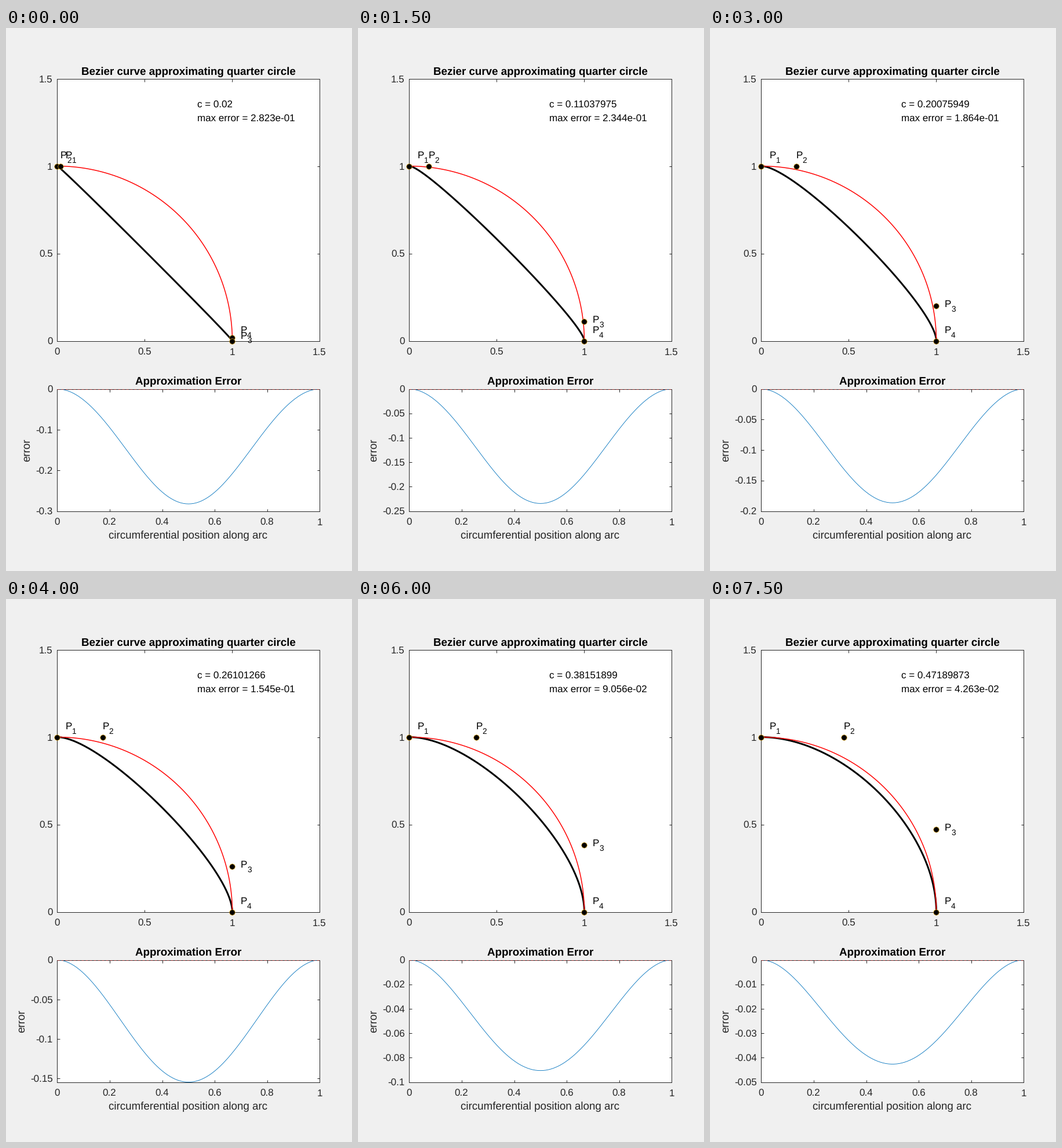
A matplotlib script for the animation above (8 s loop, 597 by 938 pixels).

```python
import math
import numpy as np
import matplotlib.pyplot as plt
from matplotlib.animation import FuncAnimation

W, H, DPI = 597, 938, 72          # at 72 dpi one point is one pixel
FRAMES, INTERVAL = 16, 500
C0, C_STEP = 0.02, 2.38 / 79
BASE, BIG = 17, 18.7
GRAY = "#262626"
BLUE, ORANGE = "#0072BD", "#EDB120"

# Panel edges in pixels from the top left, just inside the pixel centres
LEFT, RIGHT = 88.45, 541.45
TOP1, BOT1 = 87.55, 540.55
TOP2, BOT2 = 623.55, 834.55
MID = 314.5

plt.rcParams.update({
    "font.family": "Liberation Sans",
    "text.hinting": "none",
    "axes.edgecolor": GRAY,
    "axes.linewidth": 1,
})

fig = plt.figure(figsize=(W / DPI, H / DPI), dpi=DPI, facecolor="#F0F0F0")


def panel(top, bottom):
    """Axes with a full box and inward ticks."""
    ax = fig.add_axes([LEFT / W, 1 - bottom / H,
                       (RIGHT - LEFT) / W, (bottom - top) / H])
    ax.tick_params(direction="in", length=4.5, width=1, color=GRAY,
                   top=True, right=True, labelbottom=False, labelleft=False)
    return ax


def put(x, y, text="", size=BASE, color="black", ha="left", **kw):
    """Text with its baseline at a pixel position."""
    return fig.text(x / W, 1 - y / H, text, fontsize=size, color=color,
                    ha=ha, va="baseline", **kw)


def move(text, x, y):
    text.set_position((x / W, 1 - y / H))


def px(x):
    return LEFT + x / 1.5 * (RIGHT - LEFT)


def py(y):
    return BOT1 - y / 1.5 * (BOT1 - TOP1)


# Curve panel
curve_ax = panel(TOP1, BOT1)
curve_ax.set(xlim=(0, 1.5), ylim=(0, 1.5))
ticks = [0, 0.5, 1, 1.5]
curve_ax.set_xticks(ticks)
curve_ax.set_yticks(ticks)
for v in ticks:
    put(px(v) - 0.5, 565, f"{v:g}", color=GRAY, ha="center")
    put(80.5, py(v) + 6.5, f"{v:g}", color=GRAY, ha="right")
put(MID, 81, "Bezier curve approximating quarter circle", BIG,
    ha="center", weight="bold")

t = np.linspace(0, 1, 201)
arc = t * math.pi / 2
bezier, = curve_ax.plot([], [], color="black", lw=3, zorder=4)
curve_ax.plot(np.sin(arc), np.cos(arc), color="red", lw=1.5, zorder=5)
dots, = curve_ax.plot([], [], "o", ms=9.5, mfc="black", mec=ORANGE, mew=0.7,
                      zorder=6, clip_on=False)
c_text = put(px(0.8) - 0.5, 138)
err_text = put(px(0.8) - 0.5, 162)
names = [(put(0, 0, "P"), put(0, 0, str(i + 1), 0.8 * BASE)) for i in range(4)]

# Error panel
err_ax = panel(TOP2, BOT2)
err_ax.set_xlim(0, 1)
err_ax.set_xticks(np.arange(6) / 5)
for v in np.arange(6) / 5:
    put(px(1.5 * v) - 0.5, 859, f"{v:g}", color=GRAY, ha="center")
put(MID, 616.5, "Approximation Error", BIG, ha="center", weight="bold")
put(MID, 882.5, "circumferential position along arc", BIG, GRAY, "center")
y_label = put(41, 729, "error", BIG, GRAY, "center", rotation=90,
              rotation_mode="anchor")
err_ax.plot([0, 1], [0, 0], color="#8C2A2A", lw=1, dashes=(4, 3),
            zorder=4, clip_on=False)
err_line, = err_ax.plot([], [], color=BLUE, lw=0.85, zorder=3)
y_ticks = [put(80.5, 0, color=GRAY, ha="right") for _ in range(6)]


def nice_axis(peak):
    """Tick step with at most five intervals, and the axis depth."""
    power = 10.0 ** math.floor(math.log10(peak) - 1)
    step = next(m * power for m in (1, 2, 5, 10, 20, 50) if peak <= 5 * m * power)
    depth = math.ceil(peak / step) * step
    return step, depth if peak / depth > 0.8 else peak


def draw(k):
    c = C0 + k * C_STEP
    points = np.array([(0, 1), (c, 1), (1, c), (1, 0)])
    s = 1 - t
    basis = np.stack([s**3, 3 * s**2 * t, 3 * s * t**2, t**3], axis=1)
    x, y = (basis @ points).T
    error = np.hypot(x, y) - 1
    peak = abs(error).max()

    bezier.set_data(x, y)
    dots.set_data(*points.T)
    c_text.set_text(f"c = {c:.8g}")
    err_text.set_text(f"max error = {peak:.3e}")
    spots = [(0.05, 1.05), (c, 1.05), (1.05, c), (1.05, 0.05)]
    for (letter, digit), (u, v) in zip(names, spots):
        move(letter, px(u) - 0.5, py(v) + 2)
        move(digit, px(u) + 10.5, py(v) + 9.7)

    step, depth = nice_axis(peak)
    marks = np.arange(int(depth / step + 1e-6) + 1) * step
    err_line.set_data(t, error)
    err_ax.set_ylim(-depth, 0)
    err_ax.set_yticks(-marks)
    for i, label in enumerate(y_ticks):
        shown = i < len(marks)
        label.set_visible(shown)
        if shown:
            label.set_text(f"-{marks[i]:g}" if i else "0")
            move(label, 80.5, TOP2 + marks[i] / depth * (BOT2 - TOP2) + 6.5)
    move(y_label, 41 if step > 0.09 else 32, 729)
    return []


anim = FuncAnimation(fig, draw, frames=FRAMES, interval=INTERVAL,
                     init_func=lambda: draw(0), repeat=True, repeat_delay=0,
                     blit=False)
plt.show()
```
